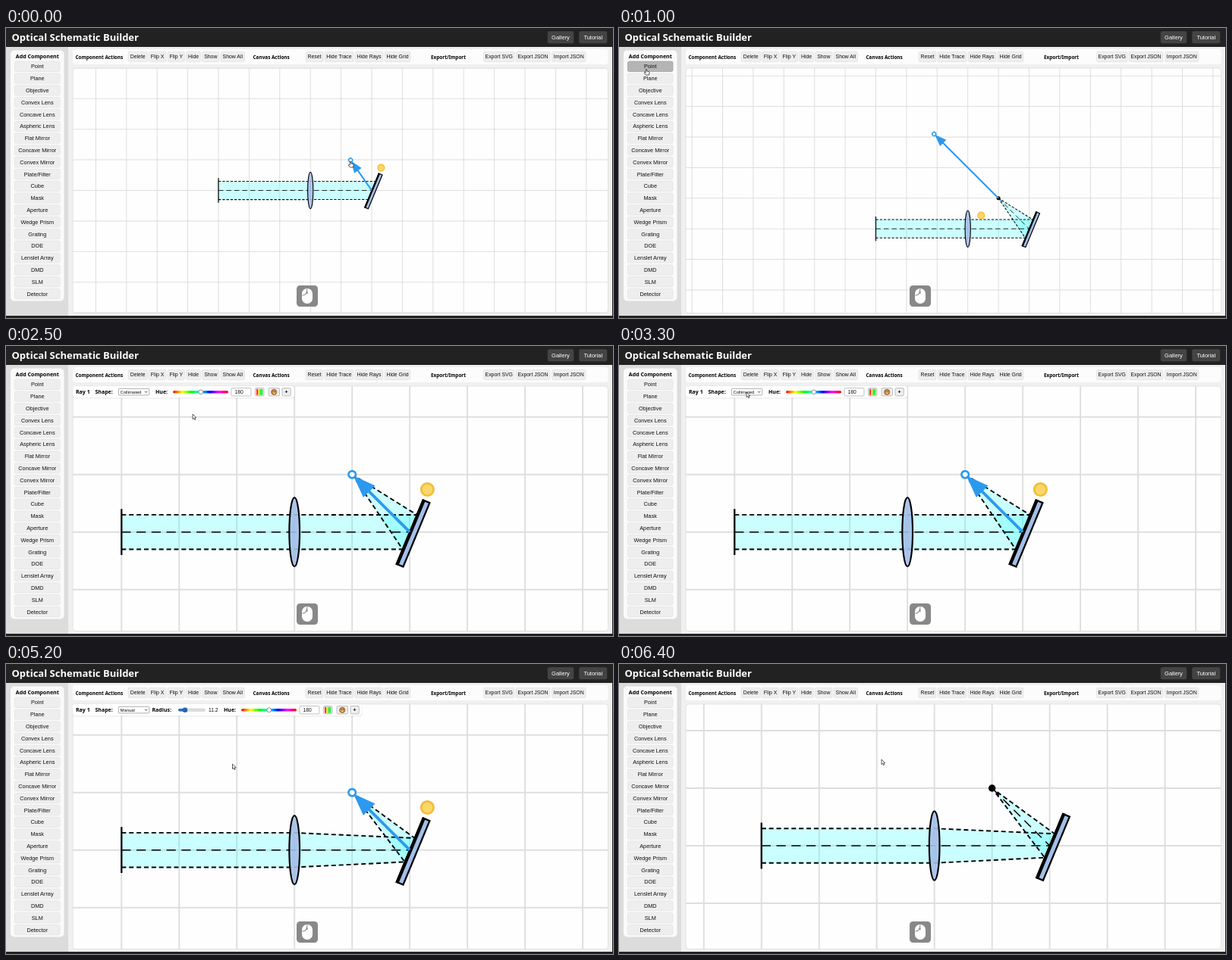
Recreate the animation shown at these times as an HTML page. Size 800 by 383 pixels, loop 6500 ms.

```html
<!DOCTYPE html>
<html lang="en">
<head>
<meta charset="utf-8">
<title>Optical Schematic Builder</title>
<style>
  html, body { margin: 0; width: 100%; height: 100%; overflow: hidden; background: #e0e0e0; }
  svg { display: block; }
  #stage { width: 100vw; height: 100vh; }
  text { font-family: "Liberation Sans", Arial, sans-serif; fill: #111; }
  .bold { font-family: "Noto Sans", "Open Sans", sans-serif; font-weight: 700; fill: #000; }
</style>
</head>
<body>
<svg id="stage" viewBox="0 0 800 383">
  <defs>
    <linearGradient id="hue"></linearGradient>
    <clipPath id="sheet"><rect x="88" y="53" width="705.5" height="323.5" rx="4"/></clipPath>
  </defs>
  <g id="chrome"></g>
  <g id="view" clip-path="url(#sheet)"></g>
  <g id="overlay"></g>
</svg>
<script>
const LOOP = 6500, STEP = 100;
const BLUE = '#2b99ee', GLASS = '#a3bfe8';
const SLOPE = Math.tan(Math.PI / 8), COS = Math.cos(Math.PI / 8);
const $ = id => document.getElementById(id);

// ---------- drawing helpers ----------
const rect = (x, y, w, h, fill, rx = 0, more = '') =>
  `<rect x="${x}" y="${y}" width="${w}" height="${h}" rx="${rx}" fill="${fill}" ${more}/>`;
const circle = (x, y, r, fill, more = '') =>
  `<circle cx="${x}" cy="${y}" r="${r}" fill="${fill}" ${more}/>`;
const label = (x, y, size, str, more = '') =>
  `<text x="${x}" y="${y}" font-size="${size}" ${more}>${str}</text>`;
const bold = (x, y, size, str, more = '') => label(x, y, size, str, 'class="bold" ' + more);
const path = (d, more) => `<path d="${d}" ${more}/>`;
const polyline = pts => 'M' + pts.map(p => p.join(' ')).join('L');

function button(x, y, w, h, size, str, fill = '#eee', ink = '#111') {
  const edge = fill === '#444' ? '#444' : fill === '#eee' ? '#e0e0e0' : '#999';
  return rect(x, y, w, h, fill, 2, `stroke="${edge}" stroke-width=".6"`) +
    label(x + w / 2, y + h / 2 + size * .36, size, str, `text-anchor="middle" style="fill:${ink}"`);
}

// Linear interpolation through [time, ...values] keys.
function track(keys, t) {
  const i = keys.findIndex(k => k[0] > t);
  if (i === 0) return keys[0].slice(1);
  if (i < 0) return keys[keys.length - 1].slice(1);
  const a = keys[i - 1], b = keys[i], u = (t - a[0]) / (b[0] - a[0]);
  return a.slice(1).map((v, j) => v + (b[j + 1] - v) * u);
}

// ---------- static interface ----------
const COMPONENTS = ['Point', 'Plane', 'Objective', 'Convex Lens', 'Concave Lens', 'Aspheric Lens',
  'Flat Mirror', 'Concave Mirror', 'Convex Mirror', 'Plate/Filter', 'Cube', 'Mask', 'Aperture',
  'Wedge Prism', 'Grating', 'DOE', 'Lenslet Array', 'DMD', 'SLM', 'Detector'];
const TOOLS = [['Delete', 161, 25.5], ['Flip X', 188, 23], ['Flip Y', 213, 22.5], ['Hide', 237.5, 19],
  ['Show', 258.5, 22.5], ['Show All', 283, 31.5], ['Reset', 395, 23], ['Hide Trace', 420, 38],
  ['Hide Rays', 460, 37], ['Hide Grid', 499, 34], ['Export SVG', 629.5, 40.5],
  ['Export JSON', 672, 45], ['Import JSON', 719.5, 44.5]];
const sideButton = (i, fill) =>
  button(11.5, 44.1 + i * 15.8, 59.5, 13.4, 7.3, COMPONENTS[i], fill);

function buildChrome() {
  $('hue').innerHTML = Array.from({ length: 7 }, (_, i) =>
    `<stop offset="${i / 6}" stop-color="hsl(${i * 60},100%,50%)"/>`).join('');
  $('chrome').innerHTML =
    rect(0, 0, 800, 383, '#f0f0f0') + rect(0, 25, 82, 355, '#dcdcdc') +
    rect(0, 0, 800, 25, '#222') + rect(0, 380, 800, 3, '#222') + rect(799, 0, 1, 383, '#222') +
    bold(7.5, 17.3, 13, 'Optical Schematic Builder', 'style="fill:#fff"') +
    button(714, 4.5, 34, 15.5, 7.5, 'Gallery', '#444', '#fff') +
    button(755.5, 4.5, 36.5, 15.5, 7.5, 'Tutorial', '#444', '#fff') +
    rect(6, 29.5, 70.5, 331, '#fafafa', 5) +
    bold(41.3, 39.8, 7.1, 'Add Component', 'text-anchor="middle"') +
    COMPONENTS.map((_, i) => sideButton(i, '#eee')).join('') +
    rect(88, 28, 705.5, 20, '#fcfcfc', 4) +
    bold(91.5, 40.5, 6.4, 'Component Actions') + bold(325.5, 40.5, 6.4, 'Canvas Actions') +
    bold(560, 40.5, 6.4, 'Export/Import') +
    TOOLS.map(([name, x, w]) => button(x, 31.3, w, 13.4, 6.9, name)).join('') +
    rect(88, 53, 705.5, 323.5, '#fefefe', 4, 'stroke="#ddd" stroke-width=".8"');
}

// ---------- schematic, in grid units from the first plane ----------
const MIRROR = [5, 0], FOCUS = [4, -1];

function arrow([x1, y1], [x2, y2]) {
  const angle = Math.atan2(y2 - y1, x2 - x1) * 180 / Math.PI;
  const len = Math.hypot(x2 - x1, y2 - y1);
  return `<g transform="translate(${x1} ${y1}) rotate(${angle})">` +
    path(`M0 0H${len - .3}`, `stroke="${BLUE}" stroke-width=".05"`) +
    path(`M${len - .03} 0l-.39 -.145v.29z`, `fill="${BLUE}"`) +
    circle(len, 0, .062, '#fff', `stroke="${BLUE}" stroke-width=".036"`) + '</g>';
}
const rotateHandle = (x, y) => circle(x, y, .108, '#fbd767', 'stroke="#f2bd3a" stroke-width=".035"');

function rays(radius, focused) {
  const h = radius / 50 * COS;
  const end = focused ? [FOCUS] : [];
  const edge = sign => [[0, sign * .3], [3, sign * .3], [5 - sign * h * SLOPE, sign * h], ...end];
  const top = edge(-1), bottom = edge(1);
  const beam = pts => path(polyline(pts) + 'Z', 'fill="#0ff" fill-opacity=".2"');
  const dash = (pts, style) => path(polyline(pts), `fill="none" stroke="#000" ${style}`);
  const outer = 'stroke-width=".025" stroke-dasharray=".08 .05"';
  return beam([...top.slice(0, 3), ...bottom.slice(0, 3).reverse()]) +
    (focused ? beam([top[2], FOCUS, bottom[2]]) : '') +
    dash(top, outer) + dash(bottom, outer) +
    dash([[0, 0], MIRROR, ...end], 'stroke-width=".02" stroke-dasharray=".16 .1"');
}

function schematic(s) {
  const parts = rays(s.radius, s.hasPoint) +
    path('M0 -.4V.4', 'stroke="#000" stroke-width=".03"') +
    `<ellipse cx="3" rx=".09" ry=".6" fill="${GLASS}" fill-opacity=".9" stroke="#000" stroke-width=".028"/>` +
    `<g transform="translate(5 0) rotate(22.5)">` +
    rect(0, -.6, .125, 1.2, GLASS, 0, 'stroke="#000" stroke-width=".03"') +
    path('M.015 -.615V.615', 'stroke="#000" stroke-width=".055"') + '</g>' +
    (s.hasPoint ? circle(...FOCUS, .062, '#000') : '');
  if (s.selected === 'mirror')
    return parts + arrow(MIRROR, s.tip) + rotateHandle(5.306, -.739);
  if (s.selected === 'point')
    return parts + arrow(FOCUS, [1.9, -3.1]) + rotateHandle(3.434, -.434);
  return parts;
}

function grid(ox, oy, size) {
  let d = '';
  for (let x = ox - Math.ceil(ox / size) * size; x < 800; x += size) d += `M${x} 50V380`;
  for (let y = oy - Math.ceil(oy / size) * size; y < 383; y += size) d += `M80 ${y}H800`;
  return path(d, `stroke="#dedede" stroke-width="${size * .025}"`);
}

// ---------- ray settings bar ----------
function settings(manual, radius) {
  const dx = manual ? 90.5 - (16.2 - radius) * .1 : 0;
  const box = (x, w, fill = '#fff') =>
    rect(x, 55.5, w, 10.5, fill, 1.5, 'stroke="#999" stroke-width=".6"');
  const thumb = 228 + radius * .71;
  let out = rect(88, 53.5, manual ? 381.5 : 292.5, 16, '#000', 4, 'opacity=".08"') +
    rect(88, 53, manual ? 381 : 292, 15.3, '#fff', 4) +
    bold(92, 63.2, 7, 'Ray 1') + bold(117.5, 63.2, 7, 'Shape:') +
    rect(148.3, 56.3, 40.5, 8.6, '#fff', 1, 'stroke="#777" stroke-width=".6"') +
    label(150.5, 62.7, 5.9, manual ? 'Manual' : 'Collimated') +
    path('M183 59.7l1.6 1.7l1.6 -1.7', 'fill="none" stroke="#222" stroke-width=".8"');
  if (manual)
    out += bold(192.5, 63.2, 7, 'Radius:') +
      rect(227, 59, 35.5, 3.6, '#ddd', 1.8, 'stroke="#bbb" stroke-width=".4"') +
      rect(227, 59, thumb - 227, 3.6, '#2871c8', 1.8) + circle(thumb, 60.8, 3.3, '#2463b0') +
      label(267, 63.1, 6.7, radius.toFixed(1));
  return out + `<g transform="translate(${dx} 0)">` + bold(197, 63.2, 7, 'Hue:') +
    rect(220, 59, 73, 3.6, 'url(#hue)', 1.8) +
    circle(256.8, 60.8, 2.9, '#fff', 'stroke="#777" stroke-width=".8"') +
    box(297, 26) + label(301.5, 63.2, 6.7, '180') +
    box(328.5, 11.5, '#eee') + rect(330, 56.8, 2.2, 8, '#f33') + rect(332.2, 56.8, 2.2, 8, '#fd3') +
    rect(334.4, 56.8, 4, 8, '#3e4') +
    box(346, 14.5, '#eee') + circle(353.2, 60.8, 3.6, '#d6914b', 'stroke="#6b4424" stroke-width=".7"') +
    circle(352, 59.7, .7, '#36c') + circle(354.7, 59.7, .7, '#d33') + circle(353.4, 62.4, .7, '#fff') +
    box(364, 11.3, '#eee') + bold(369.6, 63.1, 7, '+', 'text-anchor="middle"') + '</g>';
}

// ---------- pointer and mouse badge ----------
const POINTER = [[0, 454, 176], [300, 441.6, 175], [400, 430, 172], [800, 36, 54], [1100, 36, 54],
  [1400, 550, 289], [2100, 550, 289], [2200, 541, 250], [2500, 246, 90], [2800, 168, 61],
  [3500, 168, 61], [3800, 239, 62.5], [4300, 239, 62.5], [4900, 236, 62.5], [5200, 298.5, 132],
  [5400, 310.5, 132], [5700, 310.5, 132], [6400, 346, 126]];
const ARROW_CURSOR = 'M0 0V6.6L1.5 5.2L2.6 7.6L3.7 7.1L2.7 4.8H4.7Z';
const HAND_CURSOR = 'M-.7 .6Q0 -.7 .7 .6V3L3.6 3.7Q4.3 4 4.1 5L3.4 8H-.6L-2.8 5Q-2.6 3.9 -1.6 4.4L-.7 5.2Z';

function pointer(t) {
  const [x, y] = track(POINTER, t);
  const hand = t < 400 || (t >= 800 && t < 1200) || (t >= 3800 && t < 5000);
  return `<g transform="translate(${x} ${y})">` +
    path(hand ? HAND_CURSOR : ARROW_CURSOR, 'fill="#fff" stroke="#333" stroke-width=".8"') + '</g>';
}

function badge(count, scrolling) {
  const detail = scrolling
    ? rect(395, 347, 4, 6, '#888', 2) + path('M395.8 350.2l1.2 -1.4l1.2 1.4', 'fill="none" stroke="#fff" stroke-width=".7"')
    : path('M390.5 353Q396.5 353.5 397 344.5M397 348V351', 'fill="none" stroke="#888" stroke-width="1.1"');
  return rect(383, 340, 28, 28, '#888', 4.5) + rect(390, 344, 14, 20, '#fff', 6.8) + detail +
    (count > 1 ? circle(423.5, 354, 11.5, '#888') +
      label(423.5, 358.4, 12.5, count, 'text-anchor="middle" style="fill:#fff"') : '');
}

// ---------- timeline ----------
function viewAt(t) {
  if (t < 900) return [280, 214.5, 40.4];
  const notches = Math.max(0, Math.min(6, Math.floor((t - 1400) / 100)));
  const zoom = 1.111 ** notches;
  const [panX, panY] = track([[5700, 0, 0], [6400, 35.5, -5.7]], t);
  return [550 - 211.5 * zoom + panX, 288.5 - 23.3 * zoom + panY + notches * .17, 40.4 * zoom];
}

function clickCount(t) {
  if (t >= 1500 && t < 2200) return Math.min(6, (t - 1400) / 100);
  if (t >= 3800 && t < 4200) return 3;
  return t >= 3400 && t < 3800 ? 2 : 1;
}

function draw(t) {
  const [ox, oy, size] = viewAt(t);
  const [radius] = track([[4300, 16.2], [4900, 11.2]], t);
  const state = {
    radius,
    hasPoint: t >= 900,
    selected: t < 900 ? 'mirror' : t < 2200 ? 'point' : t < 5500 ? 'mirror' : '',
    tip: track([[0, 4.31, -.99], [300, ...FOCUS]], t)
  };
  $('view').innerHTML = grid(ox, oy, size) +
    `<g transform="translate(${ox} ${oy}) scale(${size})">${schematic(state)}</g>`;
  $('overlay').innerHTML =
    (t >= 800 && t < 1200 ? sideButton(0, '#b5b5b5') : '') +
    (t >= 2200 && t < 5500 ? settings(t >= 3400, radius) : '') +
    badge(clickCount(t), t >= 1500 && t < 2200) + pointer(t);
}

let shown = -1;
function tick() {
  const t = Math.floor(performance.now() % LOOP / STEP) * STEP;
  if (t !== shown) draw(shown = t);
  requestAnimationFrame(tick);
}
buildChrome();
tick();
</script>
</body>
</html>
```
